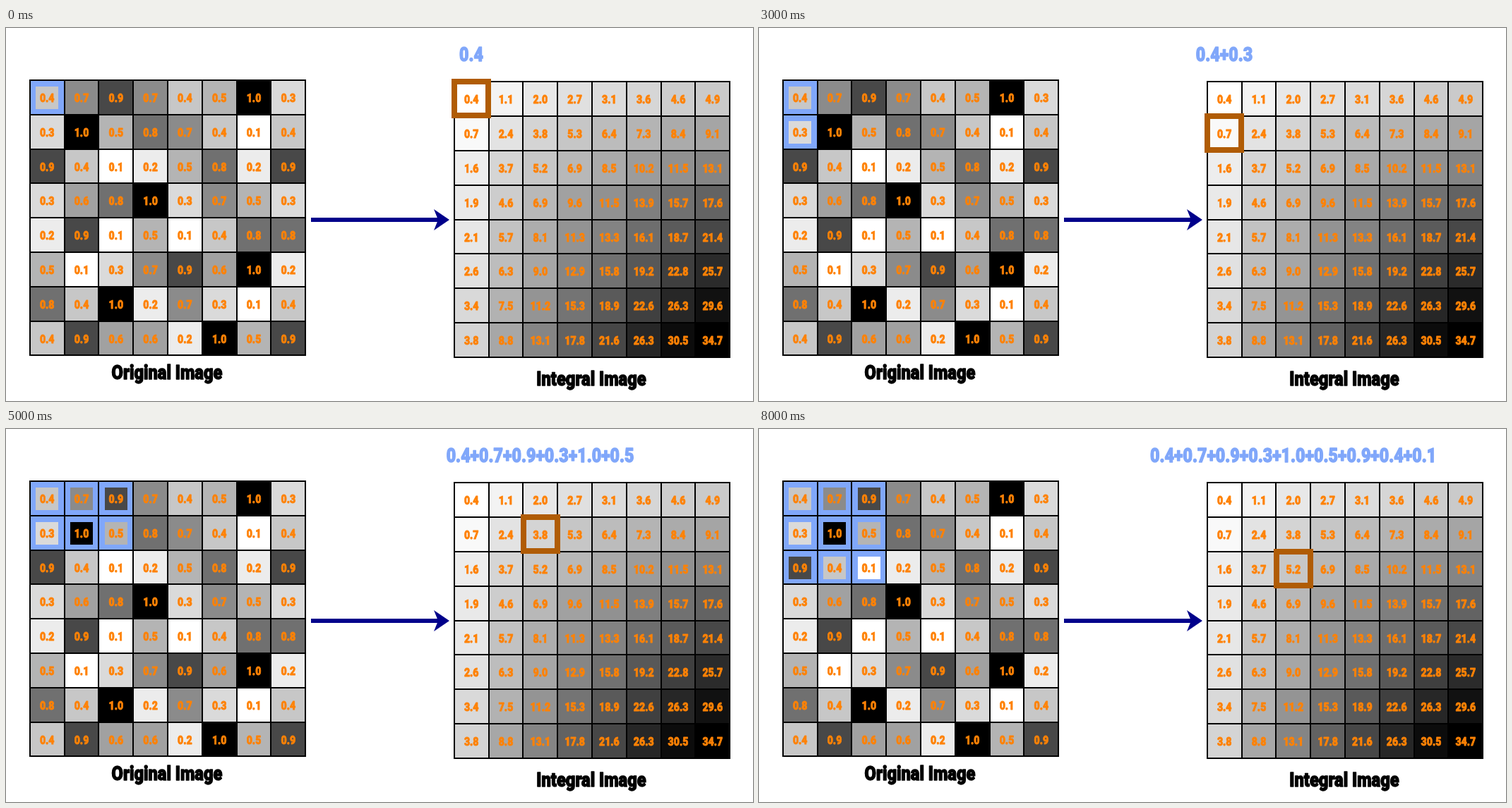
These frames come from a looping animation (1058 by 529 pixels, 9 s). An HTML page with a canvas:

```html
<!DOCTYPE html>
<html lang="en">
<head>
<meta charset="utf-8">
<title>Integral image</title>
<style>
  html, body { margin: 0; width: 100%; height: 100%; overflow: hidden; background: #fff; }
  canvas { display: block; width: 100vw; height: 100vh; }
</style>
</head>
<body>
<canvas id="stage" width="1058" height="529"></canvas>
<script>
const ctx = document.getElementById('stage').getContext('2d');

const STEP = 1000;
const WINDOW = 3;      // the highlight visits a 3 by 3 corner
const PITCH = 48.8;
const MID = PITCH / 2;
const BLUE = '#80a7fa';
const BROWN = '#b05c05';
const ORANGE = '#ff8205';
const NAVY = '#00008b';
const CONDENSE = 0.83; // narrow poster face
const CAP = 0.711;     // cap height per em

// Pixel values in tenths, one hex digit each
const pixels = '479745a3 3a587414 94125829 368a3753 29151488 513796a2 84a27314 49662a59'
  .split(' ').map(row => [...row].map(d => parseInt(d, 16)));

const sums = [];
pixels.forEach((row, r) => {
  let run = 0;
  sums.push(row.map((v, c) => (run += v) + (r ? sums[r - 1][c] : 0)));
});

// Darkness from 0 to 1
function pixelShade(v) {
  const u = (v - 1) / 9;
  return 0.66 * u + 0.34 * u ** 8;
}
const sumShade = v => Math.min(1, 1.06 * ((v - 4) / 343) ** 0.8);

const left = { x: 33.8, y: 74, values: pixels, shade: pixelShade };
const right = { x: 634.8, y: 76.3, values: sums, shade: sumShade };

const decimal = v => (v / 10).toFixed(1);

function text(str, x, y, size, color) {
  ctx.save();
  ctx.translate(x, y + size * CAP / 2);
  ctx.scale(CONDENSE, 1);
  ctx.font = `900 ${size}px Roboto, "Liberation Sans", sans-serif`;
  ctx.textAlign = 'center';
  ctx.fillStyle = ctx.strokeStyle = color;
  ctx.lineWidth = size * 0.05;
  ctx.lineJoin = 'round';
  ctx.fillText(str, 0, 0);
  ctx.strokeText(str, 0, 0);
  ctx.restore();
}

function square(cx, cy, side, color) {
  ctx.fillStyle = color;
  ctx.fillRect(cx - side / 2, cy - side / 2, side, side);
}

function eachCell(grid, visit) {
  grid.values.forEach((row, r) => row.forEach((v, c) =>
    visit(v, grid.x + c * PITCH + MID, grid.y + r * PITCH + MID, r, c)));
}

function drawGrid(grid, marked) {
  eachCell(grid, (v, x, y, r, c) => {
    const t = Math.round(255 * (1 - grid.shade(v)));
    const tone = `rgb(${t},${t},${t})`;
    square(x, y, PITCH + 0.5, marked(r, c) ? BLUE : tone);
    if (marked(r, c)) square(Math.round(x), Math.round(y + 0.6), 32, tone);
  });
  ctx.fillStyle = '#000';
  const x0 = Math.round(grid.x), y0 = Math.round(grid.y), size = Math.round(PITCH * 8) + 2;
  for (let i = 0; i <= 8; i++) {
    ctx.fillRect(Math.round(grid.x + i * PITCH) - 1, y0 - 1, 2, size);
    ctx.fillRect(x0 - 1, Math.round(grid.y + i * PITCH) - 1, size, 2);
  }
  eachCell(grid, (v, x, y) => text(decimal(v), x, y + 0.6, 17, ORANGE));
}

function drawFrame(row, col) {
  const side = 48;
  ctx.strokeStyle = BROWN;
  ctx.lineWidth = 8;
  ctx.strokeRect(Math.round(659 + col * PITCH) - side / 2,
                 Math.round(100.4 + row * PITCH) - side / 2, side, side);
}

function drawArrow() {
  ctx.fillStyle = NAVY;
  ctx.fillRect(432, 269, 182, 6);
  ctx.beginPath();
  [[628, 272], [606, 257], [612, 272], [606, 287]].forEach(p => ctx.lineTo(...p));
  ctx.fill();
}

function drawSum(row, col) {
  const terms = pixels.slice(0, row + 1).flatMap(p => p.slice(0, col + 1));
  const x = 659 + Math.max(col, row - 1) * PITCH;
  text(terms.map(decimal).join('+'), x, 37, 28, BLUE);
}

function draw(step) {
  const row = Math.floor(step / WINDOW), col = step % WINDOW;
  ctx.fillStyle = '#fff';
  ctx.fillRect(0, 0, 1058, 529);
  drawGrid(left, (r, c) => r <= row && c <= col);
  drawGrid(right, () => false);
  drawFrame(row, col);
  // The framed value stays readable above the frame's inner edge
  drawArrow();
  text('Original Image', 228, 488, 28.5, '#000');
  text('Integral Image', 829, 497, 28.5, '#000');
  drawSum(row, col);
}

const start = performance.now();
function tick() {
  draw(Math.floor((performance.now() - start) / STEP) % WINDOW ** 2);
  requestAnimationFrame(tick);
}
tick();
</script>
</body>
</html>
```
